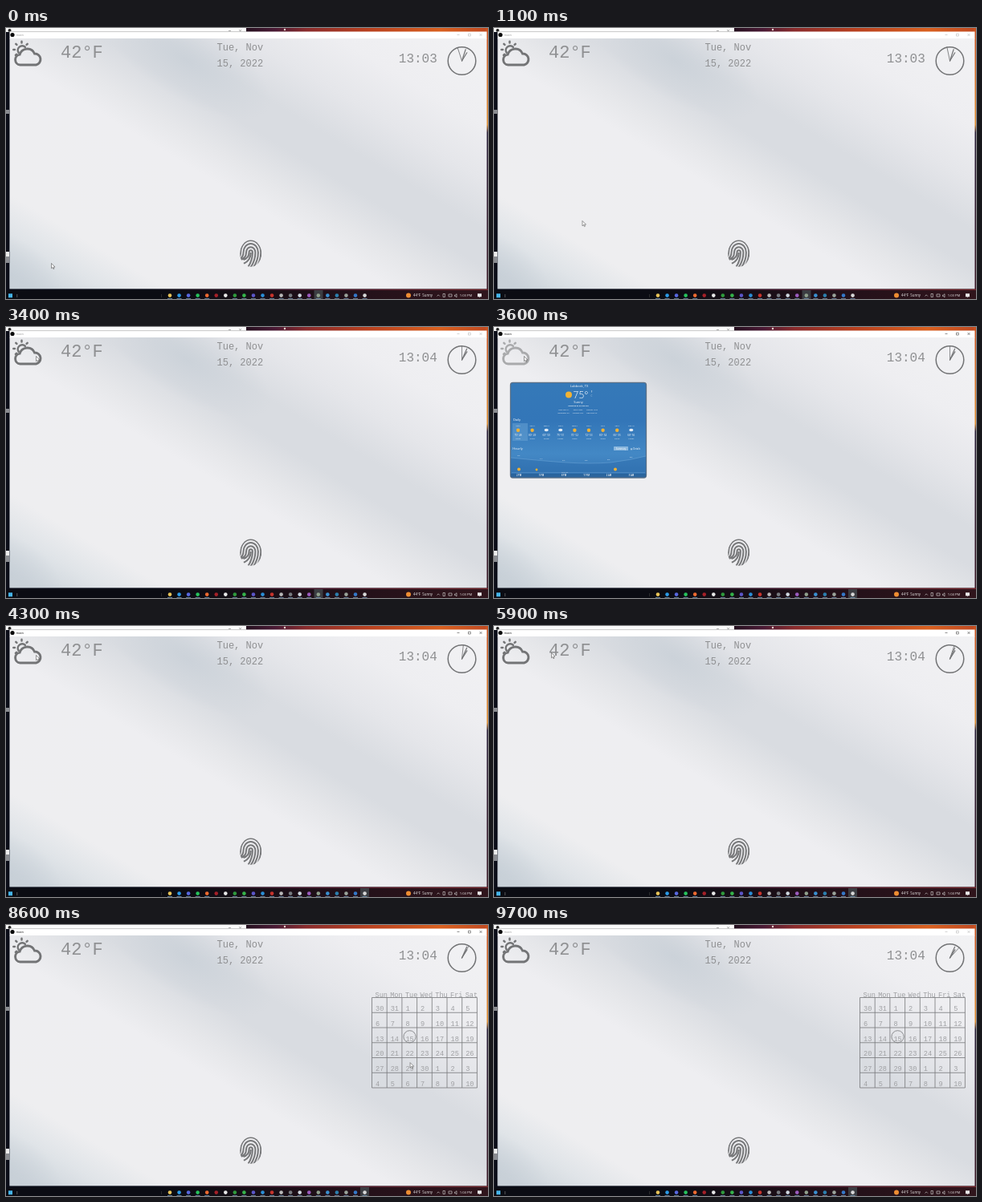
Animation, 600 px wide and 338 px high, one loop 9800 ms. Source, as an HTML page:

```html
<!DOCTYPE html>
<html lang="en">
<head>
<meta charset="utf-8">
<title>Smart mirror</title>
<style>
  html, body { margin: 0; width: 100%; height: 100%; overflow: hidden; background: #0b0b10; }
  svg { display: block; width: 600px; height: 338px; }
  text { white-space: pre; }
  .mono { font-family: "Liberation Mono", monospace; fill: #8f9092; }
  .pale { fill: #a0a1a4; }
  .ui { font-family: "Open Sans", "Noto Sans", sans-serif; }
  .mid { text-anchor: middle; }
  .line { fill: none; stroke: #77787a; }
</style>
</head>
<body>
<svg viewBox="0 0 600 338">
  <defs>
    <linearGradient id="sky" gradientUnits="userSpaceOnUse" x1="154.5" y1="-257" x2="-144" y2="240">
      <stop offset="0" stop-color="#f2f2f4"/>
      <stop offset=".17" stop-color="#eeeef1"/>
      <stop offset=".27" stop-color="#e5e6ea"/>
      <stop offset=".36" stop-color="#d9dce1"/>
      <stop offset=".43" stop-color="#d9dce1"/>
      <stop offset=".51" stop-color="#e6e7ea"/>
      <stop offset=".57" stop-color="#eeeef1"/>
      <stop offset=".82" stop-color="#eeeef0"/>
      <stop offset=".89" stop-color="#e0e4e8"/>
      <stop offset=".97" stop-color="#cbd3da"/>
    </linearGradient>
    <radialGradient id="haze">
      <stop offset="0" stop-color="#c6ced6" stop-opacity=".7"/>
      <stop offset="1" stop-color="#c6ced6" stop-opacity="0"/>
    </radialGradient>
    <linearGradient id="wallTop">
      <stop offset="0" stop-color="#25101f"/>
      <stop offset=".12" stop-color="#4a1a35"/>
      <stop offset=".25" stop-color="#8a2b2c"/>
      <stop offset=".5" stop-color="#b8401f"/>
      <stop offset=".8" stop-color="#d9601f"/>
      <stop offset="1" stop-color="#c04a22"/>
    </linearGradient>
    <linearGradient id="wallRight" x2="0" y2="1">
      <stop offset="0" stop-color="#c9501f"/>
      <stop offset=".37" stop-color="#e08f32"/>
      <stop offset=".4" stop-color="#2a2038"/>
      <stop offset="1" stop-color="#3a1826"/>
    </linearGradient>
    <linearGradient id="wallBottom">
      <stop offset=".3" stop-color="#0b0d18"/>
      <stop offset=".6" stop-color="#4a1a30"/>
      <stop offset="1" stop-color="#7a2a2e"/>
    </linearGradient>
    <linearGradient id="barFill">
      <stop offset=".35" stop-color="#0b0c13"/>
      <stop offset=".65" stop-color="#1f0f18"/>
      <stop offset="1" stop-color="#30151c"/>
    </linearGradient>
    <linearGradient id="panelFill" x2="0" y2="1">
      <stop offset="0" stop-color="#3579b8"/>
      <stop offset=".4" stop-color="#3376b8"/>
      <stop offset=".75" stop-color="#4388c5"/>
      <stop offset="1" stop-color="#3574b2"/>
    </linearGradient>
    <clipPath id="thumb"><ellipse cx="304.7" cy="281.2" rx="13.5" ry="16.6"/></clipPath>
    <clipPath id="content"><rect x="4.5" y="13" width="594" height="312.5"/></clipPath>
  </defs>

  <g id="desktop">
    <rect width="600" height="338" fill="#0b0d18"/>
    <rect x="299" width="301" height="6" fill="url(#wallTop)"/>
    <circle cx="347" cy="2" r="1.2" fill="#f3d9d2"/>
    <rect x="597" width="3" height="326" fill="url(#wallRight)"/>
    <rect width="299" height="5" fill="#fbfbfb"/>
    <circle cx="4.5" cy="3" r="2" fill="#222"/>
    <path d="M277 3.5h3M290 2l3 3m0-3l-3 3" stroke="#777" stroke-width=".6"/>
    <path d="M0 102h4v5h-4zM0 285h4v8h-4z" fill="#8b8d92"/>
    <path d="M0 279h4v6h-4z" fill="#ededed"/>
  </g>

  <g id="window">
    <rect x="4.5" y="4.5" width="594" height="9" fill="#fff"/>
    <path d="M4.5 4.6h294.5" stroke="#b4b4b4" stroke-width=".7"/>
    <circle cx="8" cy="8.5" r="2.6" fill="#0a0a0a"/>
    <text id="title" class="ui" x="12.5" y="10" font-size="4">main</text>
    <path id="buttons" d="M561.5 8.5h3M575.5 7.2h2.8v2.8h-2.8zM589.5 7l3 3m0-3l-3 3" fill="none" stroke-width=".5"/>
    <g clip-path="url(#content)">
      <rect x="4" y="13" width="595" height="313" fill="url(#sky)"/>
      <ellipse cx="225" cy="40" rx="120" ry="48" transform="rotate(31 225 40)" fill="url(#haze)"/>
      <ellipse cx="2" cy="312" rx="75" ry="50" transform="rotate(31 2 312)" fill="url(#haze)"/>
    </g>
  </g>

  <g id="weatherIcon" fill="none" stroke="#7f8082" stroke-linecap="round" stroke-width="2.9">
    <path d="M17.5 46a6.5 6.5 0 0 1-.4-12.9a9.8 9.8 0 0 1 18.4-1.1a7.1 7.1 0 0 1 2 14z"/>
    <path id="sunRays" stroke-width="2.5"/>
  </g>
  <g class="mono">
    <text x="68" y="37" font-size="22">42°F</text>
    <text x="262.5" y="28" font-size="12">Tue, Nov</text>
    <text x="262.5" y="48" font-size="12">15, 2022</text>
    <text id="time" x="488.8" y="43" font-size="16"></text>
  </g>
  <g id="clock" fill="none" stroke-linecap="round">
    <circle cx="567.5" cy="41" r="17.3" stroke-width="1.5"/>
    <path id="hour" d="M567.5 41v-12" stroke-width="1.2"/>
    <path id="minute" d="M567.5 41v-15" stroke-width="1.2"/>
    <path id="second" d="M567.5 41v-17.5" stroke-width=".8"/>
  </g>
  <g id="fingerprint" class="line" clip-path="url(#thumb)" stroke-width="2"></g>
  <g id="panel"></g>
  <g id="calendar"></g>
  <g id="taskbar"></g>
  <path id="pointer" d="M0 0v6.3l1.5-1.3 1 2.2 1-.5-1-2.1h2z" fill="#fff" stroke="#555" stroke-width=".6"/>
</svg>

<script>
const LOOP = 9800;
const $ = id => document.getElementById(id);
const range = n => [...Array(n).keys()];
const label = (x, y, size, text, extra = '') =>
  `<text class="ui mid" x="${x}" y="${y}" font-size="${size}" ${extra}>${text}</text>`;
const dot = (x, y, r, color) => `<circle cx="${x}" cy="${y}" r="${r}" fill="${color}"/>`;
const box = (x, y, w, h, fill, extra = '') =>
  `<rect x="${x}" y="${y}" width="${w}" height="${h}" fill="${fill}" ${extra}/>`;

function drawSun() {
  const at = (deg, r) => {
    const a = deg * Math.PI / 180;
    return `${19.5 + r * Math.cos(a)} ${27 + r * Math.sin(a)}`;
  };
  const rays = [138, 180, 225, 270, 315].map(a => `M${at(a, 8.6)}L${at(a, 10.2)}`);
  $('sunRays').setAttribute('d', `M${at(135, 5.4)}A5.4 5.4 0 0 1 ${at(325, 5.4)}` + rays.join(''));
}

// Nested arches whose legs all sweep down to the left.
function drawFingerprint() {
  const cx = 304.7, cy = 280;
  const ridges = [2.2, 5.7, 9.2, 12.6].map(r =>
    `M${cx - r - 7} ${cy + 9}Q${cx - r} ${cy + 7} ${cx - r} ${cy}` +
    `A${r} ${r * 1.2} 0 0 1 ${cx + r} ${cy}Q${cx + r} ${cy + 11} ${cx + r - 7} ${cy + 20}`);
  $('fingerprint').innerHTML = `<path d="${ridges.join('')}M${cx} ${cy}q0 10-9 14"/>`;
}

function drawPanel() {
  const gold = '#f2b233', white = '#e5edf5';
  let s = box(20.5, 69.3, 169, 118.7, 'url(#panelFill)', 'rx="3" stroke="#5b7188" stroke-width="1.3"');
  s += label(106, 75, 4, 'Lubbock, TX') + dot(93, 84.5, 4, gold);
  s += label(108, 89, 12, '75°', 'font-weight="300"') + label(121.5, 82, 3, 'F') + label(121.5, 87, 3, 'C', 'opacity=".6"');
  s += label(105, 95, 4, 'Sunny') + label(105, 99.3, 2.3, 'Updated as of 3:03 PM', 'font-weight="700"');
  ['Feels Like 75°', 'Wind 9 mph', 'Visibility 10 mi', 'Barometer 30.1', 'Humidity 22%', 'Dew Point 33°']
    .forEach((text, i) => { s += label(87 + i % 3 * 17.5, 104 + (i > 2) * 3.6, 2.1, text); });
  s += label(28.5, 117, 4, 'Daily') + label(29.5, 153, 4, 'Hourly');
  s += box(23, 120, 19, 22, '#6aa4d6', 'opacity=".5"');
  ['Sat 2', 'Sun 3', 'Mon 4', 'Tue 5', 'Wed 6', 'Thu 7', 'Fri 8', 'Sat 9', 'Sun 10'].forEach((day, i) => {
    const x = 30 + i * 17.6, cloudy = [2, 3, 8].includes(i);
    s += label(x, 123.7, 2.4, day);
    s += cloudy ? `<ellipse cx="${x}" cy="128.5" rx="2.6" ry="1.7" fill="${white}"/>` : dot(x, 128.7, 2.2, gold);
    s += label(x, 135.8, 3.1, `${[75, 80, 60, 75, 70, 72, 80, 66, 68][i]}° ${48 + i}`);
    s += label(x, 139.8, 2.2, cloudy ? 'Cloudy' : 'Sunny');
  });
  s += box(149, 149, 18, 5, '#8ab7de', 'rx=".6"') + label(158, 152.7, 2.8, 'Summary') + label(176, 152.7, 2.8, '▤ Details');
  s += '<path d="M21 163Q60 167 90 169T145 169Q170 166 189 161V184H21z" fill="#2c6cab" opacity=".45"/>' +
    '<path d="M21 163Q60 167 90 169T145 169Q170 166 189 161" fill="none" stroke="#7eb3e0" stroke-width=".4"/>';
  s += box(21, 183, 168, 4.4, '#205488', 'opacity=".5"');
  s += '<path d="M22 181.6h166" stroke="#78a9d5" stroke-width=".4"/>';
  ['2 PM', '5 PM', '8 PM', '11 PM', '2 AM', '5 AM'].forEach((hour, i) => {
    const x = 31 + i * 28;
    s += label(x, 186.2, 2.6, hour, 'font-weight="600"');
    s += label(x, 160.5 + [0, 4, 6, 6, 5, 2][i], 2.5, `${75 - i * 4}°`);
  });
  s += dot(31, 177.5, 2, gold) + dot(53, 178, 1.4, gold) + dot(151, 177.5, 2, gold);
  s += label(88, 182, 2.1, 'Clear sky', 'opacity=".8"');
  $('panel').setAttribute('fill', '#fff');
  $('panel').innerHTML = s;
}

function drawCalendar() {
  const left = 455.5, top = 90.5, w = 18.7, h = 18.75;
  const grid = range(8).map(c => `M${left + c * w} ${top}v${6 * h}`)
    .concat(range(7).map(r => `M${left} ${top + r * h}h${7 * w}`)).join('');
  const text = (x, y, s) => `<text class="mono pale" x="${x}" y="${y}" font-size="8.6">${s}</text>`;
  const names = ['Sun', 'Mon', 'Tue', 'Wed', 'Thu', 'Fri', 'Sat'];
  // Cells start on 30 October and run into December.
  const days = range(42).map(i => new Date(2022, 9, 30 + i).getDate());
  $('calendar').innerHTML = `<path class="line" d="${grid}" stroke-width=".8"/>` +
    names.map((n, c) => text(459.5 + c * w, 90, n)).join('') +
    days.map((d, i) => text(460 + i % 7 * w, 107.2 + Math.floor(i / 7) * h, d)).join('') +
    '<circle class="line" cx="502.5" cy="139.3" r="7.6" stroke-width=".8"/>';
}

function drawTaskbar() {
  const colors = ['#e8c458', '#2b9be8', '#5868e0', '#27c35c', '#ee6a30', '#a52028', '#e8e8e8', '#2f9a3c',
    '#35b34a', '#5b55c8', '#2a8fd8', '#c8342c', '#b8b8b8', '#777b80', '#cfd8e0', '#9c5cc0', '#8fa08c',
    '#3a8fd0', '#2c7fae', '#9aa39a', '#3478c8', '#d8d8d8'];
  let s = box(0, 325.7, 600, 2, 'url(#wallBottom)') + box(0, 327, 600, 11, 'url(#barFill)');
  s += '<rect id="activeTask" y="327" width="11" height="11" fill="#3b3d42"/>';
  s += box(3, 331.3, 5, 5, '#45b4ea') + box(13.5, 332, .7, 4, '#777') + box(193, 332, .6, 4, '#444');
  colors.forEach((color, i) => {
    const x = 204 + i * 11.55;
    s += dot(x, 333.6, 2.3, color);
    if (i !== 5 && i !== 6) s += box(x - 3, 337.3, 6, .7, '#7fa6c8');
  });
  s += dot(501, 333.5, 3, '#ef8d32');
  s += '<g fill="#eee">' + label(519, 335.3, 4.4, '44°F  Sunny') +
    '<text id="trayTime" class="ui mid" x="572.5" y="335.3" font-size="4.2"></text></g>';
  s += '<path d="M536.5 334.5l1.7-1.7 1.7 1.7M544 331.5h2.4v4h-2.4zM551 332h4v3h-4zM558.5 333h1l1.5-1.3v4.2l-1.5-1.3h-1z" fill="none" stroke="#ddd" stroke-width=".6"/>';
  s += '<path d="M587 331.3h5v4h-2l-1 1.2v-1.2h-2z" fill="#eee"/>';
  $('taskbar').innerHTML = s;
}

// Clicks and focus changes, in ms
const OPEN_WEATHER = 3500, CLOSE_WEATHER = 4200, OPEN_CALENDAR = 7400, LEAVE_CLOCK = 7900, BLUR = 9700;

// Pointer tip: time, x, y
const path = [
  [0, 56.5, 293.5], [2200, 163.5, 187.5], [2800, 92, 92], [3000, 92, 92],
  [3400, 37.5, 36.5], [4300, 37.5, 36.5], [4900, 69, 35], [5300, 70.5, 33],
  [5800, 70.5, 33], [5900, 71.5, 33.5], [6000, 71.5, 33.5], [6800, 569, 44], [7100, 571.5, 42],
  [7800, 571.5, 42], [8800, 486, 204], [9200, 262, 142], [LOOP, 262, 142]
];

function pointerAt(t) {
  const i = path.findIndex(step => step[0] > t);
  const [t0, x0, y0] = path[i - 1], [t1, x1, y1] = path[i];
  const k = (t - t0) / (t1 - t0);
  return [x0 + (x1 - x0) * k, y0 + (y1 - y0) * k];
}

const during = (t, from, to) => t >= from && t < to;
const show = (id, on) => $(id).setAttribute('visibility', on ? 'visible' : 'hidden');
const turn = (id, deg) => $(id).setAttribute('transform', `rotate(${deg} 567.5 41)`);
const shade = (id, lit) => $(id).setAttribute('stroke', lit ? '#a9aaac' : '#737476');

function render(t) {
  const active = during(t, OPEN_WEATHER, BLUR);
  const panelOpen = during(t, OPEN_WEATHER, CLOSE_WEATHER);
  const seconds = Math.floor((t - 2700) / 1000);
  const minute = seconds < 0 ? 3 : 4;
  turn('second', seconds * 6);
  turn('minute', minute * 6);
  turn('hour', 30 + minute / 2);
  $('time').textContent = `13:0${minute}`;
  $('trayTime').textContent = `1:0${t < OPEN_WEATHER ? 3 : 4} PM`;
  $('title').setAttribute('fill', active ? '#111' : '#999');
  $('buttons').setAttribute('stroke', active ? '#222' : '#aaa');
  $('activeTask').setAttribute('x', t < OPEN_WEATHER ? 383.5 : 441);
  shade('weatherIcon', panelOpen);
  shade('clock', during(t, OPEN_CALENDAR, LEAVE_CLOCK));
  show('panel', panelOpen);
  show('calendar', t >= OPEN_CALENDAR);
  show('pointer', t < BLUR);
  $('pointer').setAttribute('transform', `translate(${pointerAt(t)})`);
}

drawSun();
drawFingerprint();
drawPanel();
drawCalendar();
drawTaskbar();

const start = performance.now();
function tick() {
  const t = (performance.now() - start) % LOOP;
  render(Math.floor(t / 100) * 100);
  requestAnimationFrame(tick);
}
tick();
</script>
</body>
</html>
```
